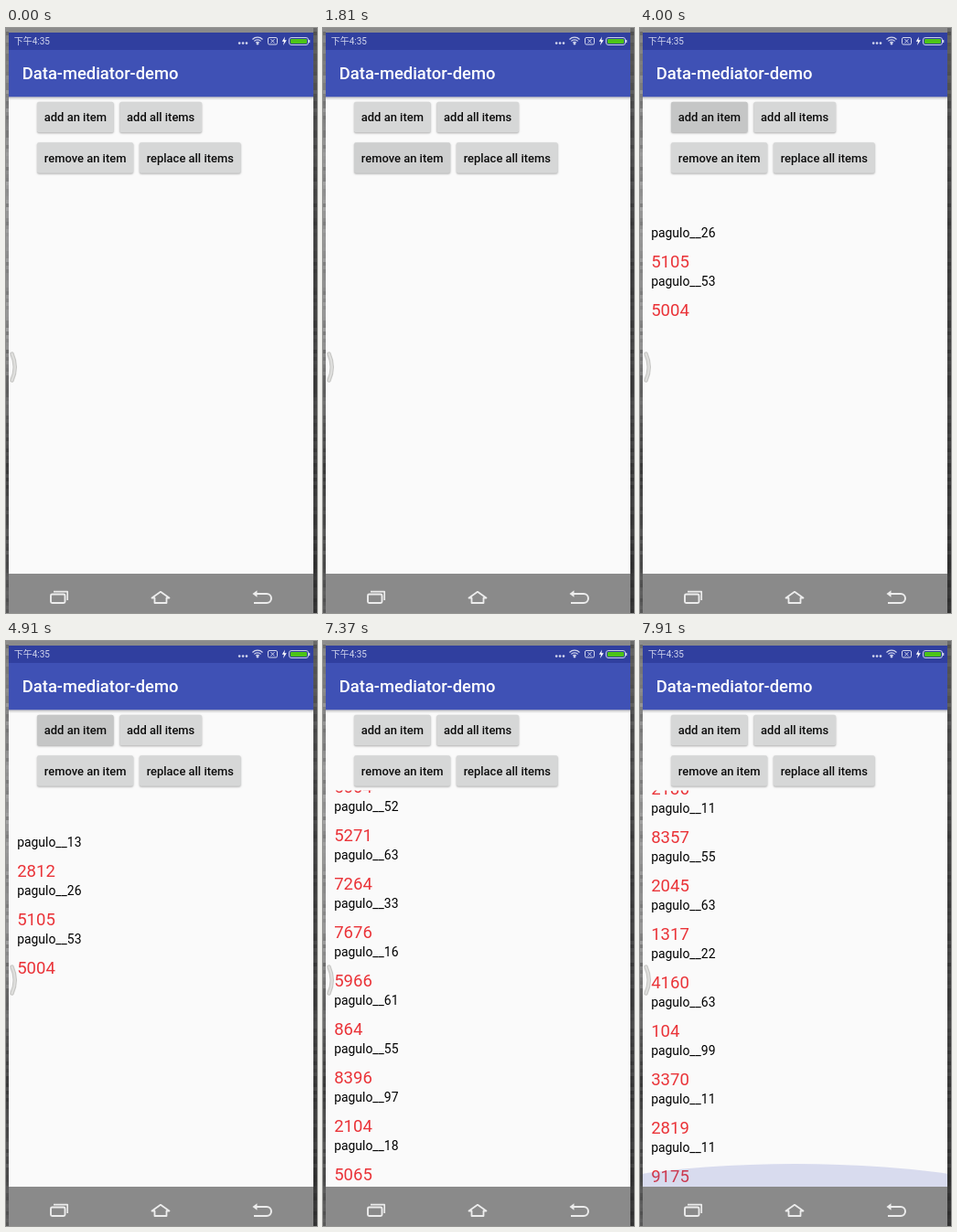
Recreate the animation shown at these times as an HTML page with a canvas. Size 340 px wide and 640 px high, loop 8000 ms.

```html
<!DOCTYPE html>
<html lang="en">
<head>
<meta charset="utf-8">
<title>List demo</title>
<style>
html, body { margin: 0; width: 100%; height: 100%; overflow: hidden; background: #fafafa; }
canvas { display: block; width: 340px; height: 640px; }
</style>
</head>
<body>
<canvas id="stage"></canvas>
<script>
const W = 340, H = 640, LOOP = 8000;
const STEP = 1000 / 11; // the screen updates eleven times a second
const LEFT = 3, RIGHT = 336, LIST_TOP = 163.5, LIST_END = 597, ROW = 53;
const BUTTON_H = 33.5, REACT = 105, SLIDE = 250, FADE = 120, RIPPLE = 580;
const FONT = 'Roboto, "Noto Sans CJK SC", "Noto Sans CJK", sans-serif';
const ADD = 'add an item', ADD_ALL = 'add all items';
const REMOVE = 'remove an item', REPLACE = 'replace all items';

// Taps in order of time; every list change follows from them
const taps = [
  [ADD, 150], [REMOVE, 1260], [ADD, 2620], [ADD, 3190],
  [ADD, 3683], [ADD, 4615], [ADD_ALL, 5764], [ADD_ALL, 6440]
];

// Texts of the items in the order they are created: id:value
const texts = ('47:3718 53:5004 26:5105 13:2812 88:4142 ' +
  '52:5271 63:7264 33:7676 16:5966 61:864 55:8396 97:2104 18:5065 42:6317 70:1482 ' +
  '29:4731 36:2136 11:8357 55:2045 63:1317 22:4160 63:104 99:3370 11:2819 11:9175').split(' ');

const canvas = document.getElementById('stage');
const ctx = canvas.getContext('2d');
const ratio = window.devicePixelRatio || 1;
canvas.width = W * ratio;
canvas.height = H * ratio;

const clamp = v => Math.max(0, Math.min(1, v));
const ease = v => 0.5 - 0.5 * Math.cos(Math.PI * clamp(v));

function rect(x, y, w, h, color) {
  ctx.fillStyle = color;
  ctx.fillRect(x, y, w, h);
}

function disc(x, y, rx, ry, color) {
  ctx.beginPath();
  ctx.ellipse(x, y, rx, ry, 0, 0, 2 * Math.PI);
  ctx.fillStyle = color;
  ctx.fill();
}

function roundPath(x, y, w, h, r) {
  ctx.beginPath();
  ctx.roundRect(x, y, w, h, r);
}

function stroke(color, width, path) {
  ctx.strokeStyle = color;
  ctx.lineWidth = width;
  if (path) ctx.stroke(new Path2D(path));
  else ctx.stroke();
}

function setFont(size, weight = 400) {
  ctx.font = `${weight} ${size}px ${FONT}`;
}

function text(str, x, y, size, color, weight) {
  setFont(size, weight);
  ctx.fillStyle = color;
  ctx.fillText(str, x, y);
}

function gradient(y0, y1, ...colors) {
  const g = ctx.createLinearGradient(0, y0, 0, y1);
  colors.forEach((c, i) => g.addColorStop(i / (colors.length - 1), c));
  return g;
}

function drawWallpaper() {
  rect(0, 0, W, 6, '#8b8b8b');
  rect(0, 0, LEFT, H, gradient(0, H, '#8d8d8d', '#a5a5a5', '#a5a5a5', '#4c4c4c', '#6a6a6a'));
  rect(RIGHT, 0, W - RIGHT, H, gradient(0, H, '#6a6a6a', '#4a4a4a', '#4a4a4a', '#3c3c3c'));
  let seed = 7;
  for (let y = 0; y < H; y += 4) {
    seed = seed * 16807 % 2147483647;
    const grain = `rgba(0,0,0,${seed / 2147483647 * 0.25})`;
    rect(0, y, LEFT, 4, grain);
    rect(RIGHT, y, W - RIGHT, 4, grain);
  }
}

function drawStatusIcons() {
  const c = '#d3d7ee';
  for (let i = 0; i < 3; i++) disc(255.2 + i * 3.9, 16.6, 1.3, 1.3, c);
  for (let r = 2.6; r < 8; r += 2.6) {
    ctx.beginPath();
    ctx.arc(275, 18, r, -Math.PI * 0.75, -Math.PI * 0.25);
    stroke(c, 1.2);
  }
  disc(275, 17.3, 1.2, 1.2, c);
  roundPath(286.5, 10.5, 10, 7.5, 1.5);
  stroke(c, 1);
  stroke(c, 1, 'M289.5 12.2l4 4.1m0 -4.1l-4 4.1');
  ctx.fillStyle = '#fff';
  ctx.fill(new Path2D('M305 9.5l-3.2 5.3h2.2l-1 4.2l3.8 -5.8h-2.4z'));
  roundPath(309.5, 10.5, 21, 8, 2.5);
  stroke('#c9cee9', 1);
  roundPath(311, 12, 18, 5, 1.2);
  ctx.fillStyle = '#4cc417';
  ctx.fill();
  rect(331, 13, 1.3, 3, '#c9cee9');
}

function drawHeader() {
  const w = RIGHT - LEFT;
  rect(LEFT, 75, w, 4, gradient(75, 79, 'rgba(0,0,0,.24)', 'rgba(0,0,0,0)'));
  rect(LEFT, 24, w, 51.3, '#3f51b5');
  rect(LEFT, 5, w, 19, '#303f9f');
  text('下午4:35', 8.7, 18, 10, '#d3d7ee');
  text('Data-mediator-demo', 17.8, 56, 18.4, '#fff', 500);
  drawStatusIcons();
}

function drawRipple(x, y, w, age) {
  if (age < 0 || age > RIPPLE) return;
  const grow = ease(age / 250);
  const strength = 1 - clamp((age - 330) / (RIPPLE - 330));
  ctx.save();
  roundPath(x, y, w, BUTTON_H, 2);
  ctx.clip();
  // moves from the touched point to the middle
  const r = w * 0.6 * grow;
  disc(x + w * (0.8 - 0.3 * grow), y + BUTTON_H / 2, r, r, `rgba(0,0,0,${0.08 * strength})`);
  ctx.restore();
}

function drawButton(label, x, y, w, t) {
  ctx.save();
  ctx.shadowColor = 'rgba(0,0,0,.3)';
  ctx.shadowBlur = 2 * ratio;
  ctx.shadowOffsetY = ratio;
  roundPath(x, y, w, BUTTON_H, 2);
  ctx.fillStyle = '#d6d7d7';
  ctx.fill();
  ctx.restore();
  for (const [target, time] of taps) {
    if (target === label) drawRipple(x, y, w, t - time);
  }
  text(label, x + 7.8, y + 21.5, 12.95, '#0c0c0c', 500);
}

function drawButtons(t) {
  [[ADD, ADD_ALL], [REMOVE, REPLACE]].forEach((labels, row) => {
    let x = 34;
    for (const label of labels) {
      setFont(12.95, 500);
      const w = ctx.measureText(label).width + 15.6;
      drawButton(label, x, 80.8 + row * 44.4, w, t);
      x += w + 6.6;
    }
  });
}

// Replays all taps up to the time t
function rowsAt(t) {
  const rows = [];
  let made = 0;
  for (const [action, time] of taps) {
    const age = t - time - REACT;
    if (age < 0) break;
    if (action === ADD) {
      const wait = rows.length ? SLIDE : 0;
      rows.forEach(row => { row.y += ROW * ease(age / SLIDE); });
      rows.unshift({ text: texts[made++], y: 0, alpha: ease((age - wait) / FADE) });
    } else if (action === REMOVE) {
      rows[0].alpha = 1 - ease(age / FADE);
      if (age >= FADE) rows.shift();
    } else {
      for (let i = 0; i < 10; i++) {
        rows.push({ text: texts[made++], y: rows.length * ROW, alpha: ease(age / FADE) });
      }
    }
  }
  return rows;
}

function scrollAt(t) {
  const u = clamp((t - 80 * STEP) / (6 * STEP));
  return 839 * (1 - (1 - u) ** 1.537);
}

function drawGlow(t) {
  const s = 0.373 * clamp((t - 7790) / 119);
  if (s) disc(169.5, LIST_END + 433 * s, 500, 500 * s, 'rgba(63,81,181,.18)');
}

function drawList(t) {
  const top = 163 - scrollAt(t);
  ctx.save();
  ctx.beginPath();
  ctx.rect(LEFT, LIST_TOP, RIGHT - LEFT, LIST_END - LIST_TOP);
  ctx.clip();
  for (const row of rowsAt(t)) {
    const [id, value] = row.text.split(':');
    ctx.globalAlpha = row.alpha;
    text(`pagulo__${id}`, 12.2, top + row.y + 16, 13.9, '#000');
    text(value, 12.2, top + row.y + 49, 18.5, '#ea3338');
  }
  ctx.globalAlpha = 1;
  drawGlow(t);
  ctx.restore();
}

function drawHandle() {
  const arc = 'M6.5 356.5Q13 371 6.5 385.5';
  ctx.lineCap = 'round';
  stroke('#c6c6c4', 4.5, arc);
  stroke('#dededc', 2.4, arc);
  ctx.lineCap = 'butt';
}

function drawNavBar() {
  const c = '#ececec';
  rect(LEFT, LIST_END, RIGHT - LEFT, H - LIST_END, '#8a8a8a');
  ctx.lineJoin = 'round';
  roundPath(49, 619.5, 15.5, 9.5, 1.5);
  stroke(c, 1.9);
  stroke(c, 1.7, 'M52 616.7h15.2v9.3');
  stroke(c, 1.8, 'M159.5 623.5l9.5 -6.7l9.5 6.7h-3v5.5h-13v-5.5z');
  stroke(c, 2, 'M273 619h12a5 5 0 0 1 0 10h-14');
  ctx.fillStyle = c;
  ctx.fill(new Path2D('M269.5 619l5 -3.7v7.4z'));
}

function draw(now) {
  const t = Math.floor((now % LOOP + 5) / STEP) * STEP;
  ctx.setTransform(ratio, 0, 0, ratio, 0, 0);
  drawWallpaper();
  rect(LEFT, 5, RIGHT - LEFT, H - 5, '#fafafa');
  drawHeader();
  drawButtons(t);
  drawList(t);
  drawHandle();
  drawNavBar();
}

const origin = performance.now();
function tick() {
  draw(performance.now() - origin);
  requestAnimationFrame(tick);
}
tick();
</script>
</body>
</html>
```
